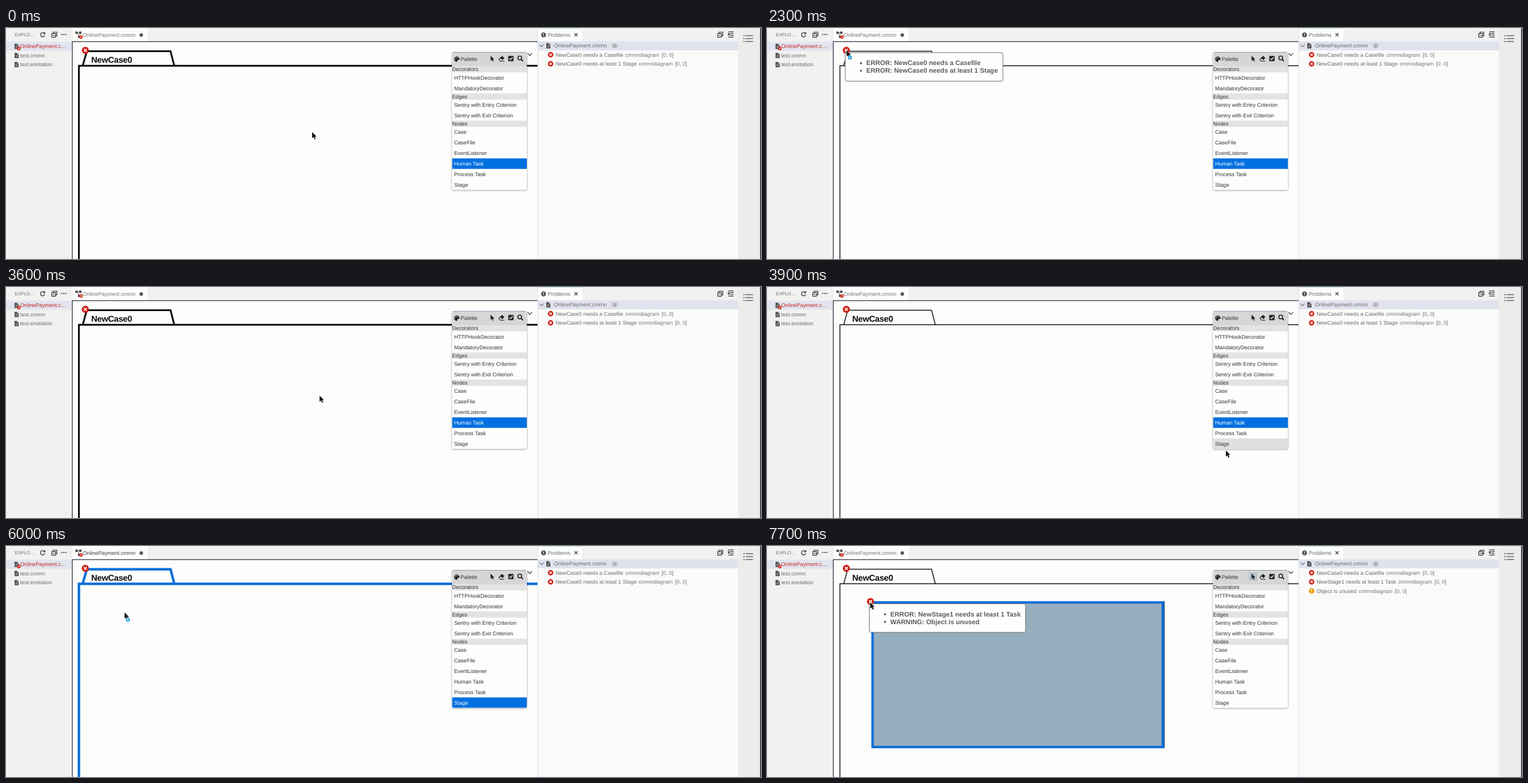
An HTML page that plays this animation: 1280 px wide and 393 px high, repeating every 8 s.

```html
<!DOCTYPE html>
<html lang="en">
<head>
<meta charset="utf-8">
<title>Case diagram editor</title>
<style>
  html, body { margin: 0; width: 100%; height: 100%; overflow: hidden; background: #fdfdfc; }
  svg { display: block; width: 100vw; height: 100vh; }
  text { font: 9.1px "Liberation Sans", Arial, sans-serif; fill: #333; white-space: pre; text-rendering: geometricPrecision; }
  .line { fill: none; stroke: #333; stroke-width: 1.2; }
  .muted { fill: #6b6b6b; }
  .soft { fill: #777; }
  .error { fill: #c4261d; }
  .tip { font-size: 11.2px; font-weight: bold; fill: #5d5d58; }
  #case { fill: none; stroke: #17171c; stroke-width: 1.5; }
  #case.hover { stroke: #0b0b0b; stroke-width: 3; }
  #case.target { stroke: #0b6fd8; stroke-width: 4.2; }
</style>
</head>
<body>
<svg id="stage" viewBox="0 0 1280 393" preserveAspectRatio="none"></svg>
<script>
const LOOP = 8000, STEP = 100;
const BLUE = '#0070e0', RED = '#cf1d12';

// Times of the user's actions
const ON_MARKER = 1100, OFF_MARKER = 3200, OVER_PALETTE = 3900, PICK = 4100,
      BACK_ON_CASE = 4200, CREATE = 6200, ON_STAGE_MARKER = 6600;

// Pointer path: time, x, y
const path = [
  [0, 519, 177], [100, 519, 177], [200, 519, 176], [300, 519, 176],
  [600, 209, 81], [700, 209, 81], [900, 137, 43], [1000, 137, 43],
  [1100, 135, 38], [3100, 135, 38], [3200, 152, 41], [3900, 778, 278],
  [4000, 774, 268], [4700, 330, 190], [4800, 330, 190], [5200, 203, 120],
  [5500, 203, 120], [5700, 201, 117], [5800, 201, 117], [6000, 201, 113],
  [6100, 201, 113], [6200, 206, 93], [6300, 206, 93], [6600, 175, 96], [LOOP, 175, 96]
];

const rect = (x, y, w, h, fill, extra = '') =>
  `<rect x="${x}" y="${y}" width="${w}" height="${h}" fill="${fill}" ${extra}/>`;
const text = (x, y, s, cls = '', extra = '') =>
  `<text x="${x}" y="${y}" class="${cls}" ${extra}>${s}</text>`;
const line = (d, extra = '') => `<path class="line" d="${d}" ${extra}/>`;
const at = (x, y, body) => `<g transform="translate(${x} ${y})">${body}</g>`;
const during = (from, to, body) => `<g data-from="${from}" data-to="${to}">${body}</g>`;

const cross = (x, y, r, w) => at(x, y, `<circle r="${r}" fill="${RED}"/>` +
  `<path d="M${-r * .4} ${-r * .4}L${r * .4} ${r * .4}M${r * .4} ${-r * .4}L${-r * .4} ${r * .4}" stroke="#fff" stroke-width="${w}"/>`);
const bang = (x, y, r, fill) => at(x, y, `<circle r="${r}" fill="${fill}"/>` +
  `<path d="M0 ${-r * .6}V${r * .15}M0 ${r * .35}V${r * .62}" stroke="#fff" stroke-width="1.3"/>`);
const fileIcon = (x, y) => at(x, y, `<path d="M-3.5 -4.5H1L3.5 -2V4.5H-3.5Z" fill="#4c4c4c"/>` +
  `<path d="M-2 0H2M-2 2H2M1 -4.5V-2H3.5" fill="none" stroke="#ddd" stroke-width=".7"/>`);
const collapseIcon = (x, y) => at(x, y,
  line('M-2 -2V-4.3H4.3V2H2M-4.3 -2H2V4.3H-4.3ZM-2.8 1.2H.5'));

function explorer() {
  const files = ['OnlinePayment.c…', 'test.cmmn', 'test.enotation'];
  return rect(0, 0, 112, 393, '#f1f1f0') + rect(0, 23.3, 112, 15.4, '#e2e5ef') +
    text(15, 14.3, 'EXPLO…', 'muted', 'style="font-size:7.7px"') +
    at(62, 11.5, line('M3.4 -1.8A3.7 3.7 0 1 0 3.7 1M3.8 -4.5V-1.5H.8')) +
    collapseIcon(82, 11.3) +
    [94.5, 98, 101.5].map(x => `<circle cx="${x}" cy="11" r="1.1" fill="#333"/>`).join('') +
    files.map((name, i) => fileIcon(18, 31.3 + 15.5 * i) +
      text(24, 34.4 + 15.5 * i, name, i ? 'muted' : 'error')).join('') +
    cross(21.7, 35, 3, .9);
}

function editorFrame() {
  return rect(112, 0, 790, 23, '#f1f1f0') + rect(113, 0, 127, 23, '#fdfdfc') +
    at(122, 11, '<path d="M-4 -3H4M-1 -3L2 3" stroke="#555" fill="none"/>' +
      rect(-4.5, -5, 4, 4, '#555') + rect(2, -5, 4, 4, '#555') + rect(0, 2, 4, 4, '#555')) +
    cross(127, 15.3, 3, .9) +
    text(130, 14.8, 'OnlinePayment.cmmn', '', 'id="tabName"') +
    '<circle cx="229.3" cy="12" r="3" fill="#555"/>' +
    rect(112, 22.6, 790, 1.2, '#2a2a3c') + rect(111.8, 23, 1.2, 370, '#2a2a3c');
}

function caseAndStage() {
  const stage = rect(177, 94, 497, 250, '#10233c') +
    rect(179, 96, 492, 246, '#97aebe', 'stroke="#0b70da" stroke-width="4.2"') +
    text(185.5, 115.8, 'NewStage1', '', 'style="font-size:14.1px;fill:#4c5a64"') +
    cross(175.5, 94.5, 6, 1.6);
  return '<g clip-path="url(#canvasClip)">' +
    '<path id="case" d="M123.6 420V64.3H1000M130 64.3L137 39.6H279L285.3 64.3"/>' +
    text(144.5, 59.3, 'NewCase0', '', 'style="font-size:14.3px;font-weight:bold;letter-spacing:-.3px;fill:#0b0b0b"') +
    cross(134.5, 38, 6, 1.6) + during(CREATE, LOOP, stage) + '</g>';
}

function palette() {
  const groups = {
    Decorators: ['HTTPHookDecorator', 'MandatoryDecorator'],
    Edges: ['Sentry with Entry Criterion', 'Sentry with Exit Criterion'],
    Nodes: ['Case', 'CaseFile', 'EventListener', 'Human Task', 'Process Task', 'Stage']
  };
  const ROW = 17.9, HEAD = 10.5, X = 756.3, W = 126.7;
  let y = 65, body = '';
  const chosen = (from, to, name) => during(from, to,
    rect(X, y, W, ROW, BLUE) + text(759.7, y + 12.2, name, '', 'style="fill:#fff"'));
  for (const [group, items] of Object.entries(groups)) {
    body += rect(X, y, W, HEAD, '#e3e3e3') + text(X, y + 8.4, group);
    y += HEAD;
    for (const name of items) {
      if (name === 'Stage') body += during(OVER_PALETTE, PICK, rect(X, y, W, ROW, '#dfdfdf'));
      body += text(759.7, y + 12.2, name);
      if (name === 'Human Task') body += chosen(0, PICK, name);
      if (name === 'Stage') body += chosen(PICK, CREATE, name);
      y += ROW;
    }
  }
  const tools =
    during(CREATE, LOOP, rect(817, 45, 14, 14, '#b4c4ce')) +
    at(821.5, 47, '<path d="M0 0V9L2.2 7L3.7 10.2L5.2 9.5L3.8 6.4H6.4Z" fill="#222"/>') +
    at(840, 52, '<path d="M-5 1L1 -4.5L5 -1L0 4H5V5H-2.5Z" fill="#222"/><path d="M-3.5 1.2L-1.8 -.3L1.4 2.6L0 4H-1.8Z" fill="#ddd"/>') +
    at(856, 52, rect(-4.5, -4.5, 9, 9, '#222', 'rx="1"') + '<path d="M-2.6 0L-.7 2L2.8 -2" fill="none" stroke="#eee" stroke-width="1.4"/>') +
    at(872, 52, '<circle cx="-1" cy="-1" r="3.2" fill="none" stroke="#222" stroke-width="1.6"/><path d="M1.3 1.3L4.5 4.5" stroke="#222" stroke-width="1.9"/>');
  const paint = '<path d="M0 -4.5A4.5 4.5 0 1 0 0 4.5C1.5 4.5 .2 2 1.6 1.5C3 1 4.5 2 4.5 0A4.5 4.5 0 0 0 0 -4.5Z" fill="#222"/>' +
    [[-2.5, 0], [-1.4, -2.4], [1.4, -2.4]].map(([x, y]) => `<circle cx="${x}" cy="${y}" r=".8" fill="#ddd"/>`).join('');
  return rect(X, 41, W, 234.3, '#fdfdfc', 'rx="3" filter="url(#shadow)"') +
    '<g clip-path="url(#paletteClip)">' + rect(X, 41, W, 24, '#d6d6d6') + rect(X, 41, W, 1, '#8fa3b4') +
    at(764.3, 53, paint) + text(770.8, 56.3, 'Palette') + tools + body + '</g>' +
    line('M884.3 42.8L888 46.8L891.8 42.8');
}

function problems() {
  const entry = (i, message, icon) => icon(923.3, 45.4 + 15.5 * i) +
    text(931.7, 48.6 + 15.5 * i, `${message}<tspan dx="3.5" class="soft">cmmndiagram</tspan><tspan dx="4" class="soft">[0, 0]</tspan>`, 'muted');
  const error = (x, y) => cross(x, y, 4.6, 1.5);
  const warning = (x, y) => bang(x, y, 4.6, '#e8a20c');
  const badge = n => text(1032, 32.8, n, 'muted', 'text-anchor="middle" style="font-size:7px"');
  return rect(901, 0, 340, 23, '#f1f1f0') + rect(901, 23, 340, 370, '#fafaf9') +
    rect(902, 0, 75, 23, '#fdfdfc') + rect(902, 0, 75, 1, '#b4d9dc') +
    rect(901, 0, .8, 393, '#d4d5e2') + rect(901.8, 22.6, 339.2, 15.4, '#e0e3ee') +
    bang(911.3, 11.7, 4.2, '#505050') + text(918.5, 14.8, 'Problems', 'muted') +
    line('M963.8 9L969 14.2M969 9L963.8 14.2') + collapseIcon(1211, 11.3) +
    at(1229, 11, line('M-4.5 -4.3H4.5M-1 -1.4H4.5M-1 1.5H4.5M-4.5 4.4H4.5M-5 -2L-2 1.5M-2 -2L-5 1.5')) +
    line('M904.5 28.3L908 32L911.5 28.3', 'style="stroke-width:1"') + fileIcon(919.5, 30.2) +
    text(929, 33.2, 'OnlinePayment.cmmn', 'muted') +
    rect(1026.5, 26, 11, 8.6, '#c6c7cb', 'rx="4.3"') +
    entry(0, 'NewCase0 needs a Casefile', error) +
    during(0, CREATE, badge(2) + entry(1, 'NewCase0 needs at least 1 Stage', error)) +
    during(CREATE, LOOP, badge(3) + entry(1, 'NewStage1 needs at least 1 Task', error) +
      entry(2, 'Object is unused', warning)) +
    rect(1241, 0, 39, 393, '#ececeb') + rect(1278.6, 0, 1.4, 393, '#20202c') +
    [13, 18, 23].map(y => rect(1250, y - 1, 2.4, 2.2, '#888') + rect(1254, y - 1, 12.5, 2, '#888')).join('');
}

const tooltip = (x, y, w, lines) => at(x, y,
  rect(0, 0, w, 48.6, '#fefefd', 'rx="3" stroke="#6e6e6a"') +
  lines.map((s, i) => `<circle cx="26.7" cy="${18 + 12.8 * i}" r="1.8" fill="#5d5d58"/>` +
    text(35.5, 21.6 + 12.8 * i, s, 'tip')).join(''));

const plus = at(5.7, 12.2, '<circle r="3.4" fill="#1a9ade"/><path d="M-1.8 0H1.8M0 -1.8V1.8" stroke="#fff" stroke-width="1"/>');
const pointer = '<g id="pointer"><path d="M0 0V10.6L2.4 8.4L4.3 12.4L6 11.6L4.2 7.8H7.5Z" fill="#111" stroke="#fff" stroke-width="1" paint-order="stroke"/>' +
  during(ON_MARKER, OFF_MARKER, plus) + during(BACK_ON_CASE, CREATE, plus) + '</g>';

document.getElementById('stage').innerHTML =
  `<defs><clipPath id="canvasClip">${rect(113, 24, 788, 369, '#000')}</clipPath>` +
  `<clipPath id="paletteClip">${rect(756.3, 41, 126.7, 234.3, '#000', 'rx="3"')}</clipPath>` +
  '<filter id="shadow"><feDropShadow dx="0" dy="1" stdDeviation="1.6" flood-opacity=".45"/></filter></defs>' +
  rect(0, 0, 1280, 393, '#fdfdfc') + explorer() + editorFrame() + caseAndStage() + palette() + problems() +
  during(2300, 3300, tooltip(132.7, 41.9, 267.3,
    ['ERROR: NewCase0 needs a Casefile', 'ERROR: NewCase0 needs at least 1 Stage'])) +
  during(7700, LOOP, tooltip(173.5, 98.3, 265,
    ['ERROR: NewStage1 needs at least 1 Task', 'WARNING: Object is unused'])) +
  pointer;

const timed = [...document.querySelectorAll('[data-from]')];
const caseShape = document.getElementById('case');
const tabName = document.getElementById('tabName');
const pointerShape = document.getElementById('pointer');
const within = (t, from, to) => t >= from && t < to;

function pointerAt(t) {
  const i = path.findIndex(key => key[0] > t);
  const [t0, x0, y0] = path[i - 1], [t1, x1, y1] = path[i];
  const u = (t - t0) / (t1 - t0), k = u * u * (3 - 2 * u);
  return [x0 + (x1 - x0) * k, y0 + (y1 - y0) * k];
}

function caseState(t) {
  if (within(t, BACK_ON_CASE, CREATE)) return 'target';
  const off = within(t, ON_MARKER, OFF_MARKER) || within(t, OVER_PALETTE, BACK_ON_CASE) || t >= ON_STAGE_MARKER;
  return off ? '' : 'hover';
}

function draw(now) {
  const t = Math.floor(now % LOOP / STEP) * STEP;
  for (const el of timed)
    el.style.display = within(t, +el.dataset.from, +el.dataset.to) ? '' : 'none';
  caseShape.setAttribute('class', caseState(t));
  tabName.style.fill = within(t, PICK, CREATE) ? '#3a3a3a' : '#777';
  pointerShape.setAttribute('transform', `translate(${pointerAt(t)})`);
}

const start = performance.now();
(function tick() {
  draw(performance.now() - start);
  requestAnimationFrame(tick);
})();
</script>
</body>
</html>
```
